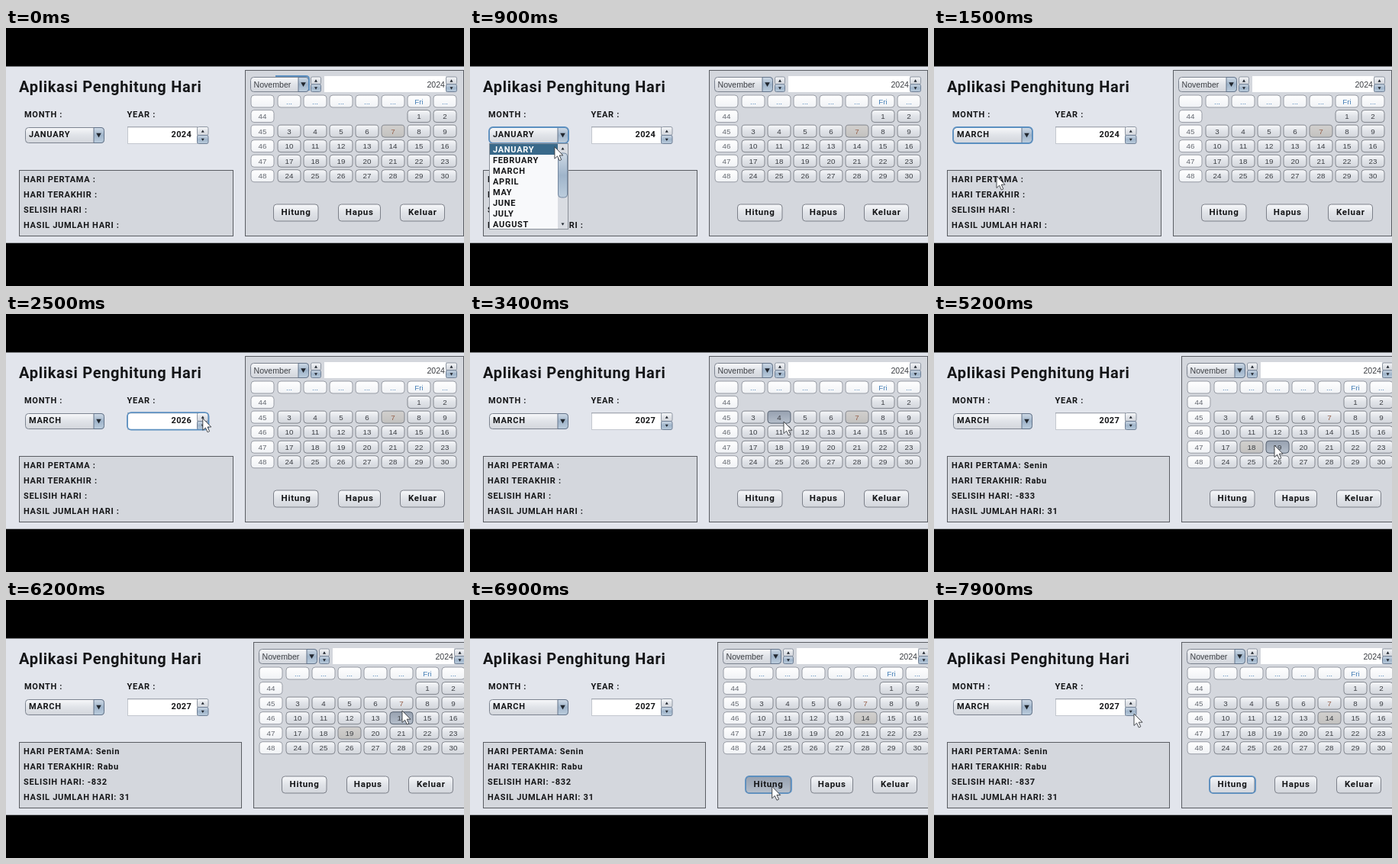
Write an HTML page that moves like this. It is 600x338 px and loops after 8 s.

```html
<!DOCTYPE html>
<html lang="id">
<head>
<meta charset="utf-8">
<title>Aplikasi Penghitung Hari</title>
<style>
  html, body { margin: 0; width: 100%; height: 100%; overflow: hidden; background: #000; }
  svg { display: block; width: 600px; height: 338px; }
  .din { font: 600 11px Roboto, sans-serif; letter-spacing: .7px; fill: #141517; white-space: pre; }
  .title { font-size: 20px; letter-spacing: .7px; }
  .num { letter-spacing: .4px; }
  .btn { font-size: 11.5px; letter-spacing: .75px; }
  .cal { font: 9.8px "Liberation Sans", Arial, sans-serif; fill: #3c3f44; }
  .big { font-size: 10.6px; }
  .mid { text-anchor: middle; }
  .end { text-anchor: end; }
</style>
</head>
<body>
<svg id="stage" viewBox="0 0 600 338">
  <defs>
    <linearGradient id="face" x2="0" y2="1">
      <stop stop-color="#f7f8fa"/><stop offset=".5" stop-color="#e0e3e8"/><stop offset="1" stop-color="#d3d6dc"/>
    </linearGradient>
    <linearGradient id="pale" x2="0" y2="1">
      <stop stop-color="#fff"/><stop offset="1" stop-color="#f0f2f5"/>
    </linearGradient>
    <linearGradient id="picked" x2="0" y2="1">
      <stop stop-color="#d2d0ce"/><stop offset="1" stop-color="#c2c1bf"/>
    </linearGradient>
    <linearGradient id="down" x2="0" y2="1">
      <stop stop-color="#98a2b1"/><stop offset=".5" stop-color="#a5afbd"/><stop offset="1" stop-color="#b6bfcb"/>
    </linearGradient>
    <linearGradient id="blue" x2="0" y2="1">
      <stop stop-color="#cfdae6"/><stop offset=".5" stop-color="#9fb4ca"/><stop offset="1" stop-color="#bccddd"/>
    </linearGradient>
  </defs>
</svg>
<script>
const NS = 'http://www.w3.org/2000/svg', LOOP = 8000, STEP = 100, SHIFT = 11;
const stage = document.getElementById('stage');

function add(parent, tag, attrs = {}, text) {
  const el = document.createElementNS(NS, tag);
  for (const k in attrs) el.setAttribute(k, attrs[k]);
  if (text !== undefined) el.textContent = text;
  parent.appendChild(el);
  return el;
}
const box = (p, x, y, width, height, fill, stroke = 'none', rx = 0) =>
  add(p, 'rect', { x, y, width, height, fill, stroke, rx });
const label = (p, x, y, text, cls) => add(p, 'text', { x, y, class: cls }, text);
const show = (el, on) => el.setAttribute('visibility', on ? 'visible' : 'hidden');

function ring(p, x, y, w, h) {
  const el = box(p, x, y, w, h, 'none', '#5b8fc0', 5);
  el.setAttribute('stroke-width', 1.8);
  return el;
}
function arrow(p, x, y, s, dir) {
  add(p, 'path', { d: `M${x - s} ${y - s * dir * .8}h${2 * s}l${-s} ${s * dir * 1.7}z`, fill: '#20262e' });
}
function combo(p, x, y, w, h) {
  box(p, x + .5, y + .5, w - 1, h - 1, 'url(#face)', '#7d8490', 4);
  add(p, 'path', {
    d: `M${x + w - 14} ${y + .5}h10q3.5 0 3.5 4v${h - 9}q0 4 -3.5 4h-10z`,
    fill: 'url(#blue)', stroke: '#64748a'
  });
  arrow(p, x + w - 7.5, y + h / 2, 3.3, 1);
}
function spinner(p, x, y, w, h) {
  const half = h / 2;
  box(p, x + .5, y + .5, w - 1, half - .5, 'url(#face)', '#8f97a3', 2);
  box(p, x + .5, y + half, w - 1, half - .5, 'url(#blue)', '#6f7f95', 2);
  arrow(p, x + w / 2, y + half / 2 + .5, 2, -1);
  arrow(p, x + w / 2, y + half * 1.5, 2, 1);
}
function field(p, x, y, w, h) {
  box(p, x + .5, y + .5, w - 1, h - 1, '#fff', '#c3c7ce');
  box(p, x, y, w, 1.3, '#a4a9b2');
}

box(stage, 0, 0, 600, 338, '#000');
const win = add(stage, 'g');
box(win, 0, 50.4, 600, 231.3, '#e2e5ec');

// Inputs on the left
label(win, 17, 84, 'Aplikasi Penghitung Hari', 'din title');
label(win, 24, 117, 'MONTH :', 'din');
label(win, 158.5, 117, 'YEAR :', 'din');
combo(win, 25, 130, 104, 21);
const monthText = label(win, 30, 143, '', 'din');
const monthRing = ring(win, 25, 130, 104, 21);
field(win, 159, 129, 92, 23);
spinner(win, 250, 129, 15.5, 23);
const yearText = label(win, 243.3, 143, '', 'din num end');
const yearRing = ring(win, 159, 129.2, 106.5, 22.5);

// Result panel
const panel = box(win, 17.5, 186.5, 280, 86, '#d4d7dd', '#5a5d63');
const heads = ['HARI PERTAMA', 'HARI TERAKHIR', 'SELISIH HARI', 'HASIL JUMLAH HARI'];
const lines = heads.map((_, i) => label(win, 23, 202 + 20.1 * i, '', 'din'));

// Calendar panel
const cal = add(win, 'g');
box(cal, 313.5, 55.5, 286, 217, '#d4d7dd', '#5a5d63');
combo(cal, 320, 64, 77, 20);
label(cal, 324.5, 78, 'November', 'cal big');
const calRing = add(cal, 'path', {
  d: 'M353 63H393q4 0 4 4V82', fill: 'none', stroke: '#5b8fc0', 'stroke-width': 1.8
});
spinner(cal, 399, 63.5, 14, 20.5);
box(cal, 417, 63, 159, 21, '#fff');
label(cal, 575, 78, '2024', 'cal big end');
spinner(cal, 576, 63.5, 15, 20.5);

const colX = c => 371 + 34 * c, rowY = r => 96 + 19.55 * r;
function cell(x, y, text, pale) {
  const face = box(cal, x - 15, y - 8, 30, 16, pale ? 'url(#pale)' : 'url(#face)', pale ? '#999da6' : '#82868e', 4);
  const txt = label(cal, x, y + 3.6, text, 'cal mid');
  return { face, txt };
}
for (let r = 0; r < 6; r++) {
  const week = cell(336, rowY(r), r ? 43 + r : '', true);
  week.txt.style.fill = '#666a72';
}
for (let c = 0; c < 7; c++) {
  const head = cell(colX(c), rowY(0), c === 5 ? 'Fri' : '...', true);
  head.txt.style.fill = '#4a82b8';
}
const days = {};
for (let d = 1; d <= 30; d++) {
  const n = d + 4;
  days[d] = cell(colX(n % 7), rowY(1 + Math.floor(n / 7)), d);
}
days[7].txt.style.fill = '#96604a';

const buttons = [['Hitung', 350, 59.5], ['Hapus', 435, 56], ['Keluar', 516, 59]].map(([name, x, w]) => {
  const face = box(cal, x + .5, 231, w - 1, 22, 'url(#face)', '#7c8089', 4);
  label(cal, x + w / 2 + .3, 245, name, 'din btn mid');
  return face;
});
const calcRing = ring(cal, 350, 231, 60, 22.2);

// Month list
const names = ['JANUARY', 'FEBRUARY', 'MARCH', 'APRIL', 'MAY', 'JUNE', 'JULY', 'AUGUST'];
const popup = add(win, 'g');
box(popup, 25.5, 151.5, 103, 112, '#f8f9fb', '#8a9099');
const rows = names.map((name, i) => {
  const bar = box(popup, 26, 152 + 14 * i, 89, 14, '#39698a');
  return { bar, txt: label(popup, 30, 163 + 14 * i, name, 'din') };
});
box(popup, 115, 152, 13, 111, '#d9dce2');
box(popup, 115.5, 164, 12, 58, 'url(#blue)', '#7488a0', 4);
arrow(popup, 121.5, 158, 2, -1);
arrow(popup, 121.5, 257, 2, 1);

const cursor = add(stage, 'path', {
  d: 'M0 0V15.5L3.6 12.2L6.3 18L8.8 16.8L6.2 11.2H11Z',
  fill: '#fff', stroke: '#33363b', 'stroke-width': .9, 'stroke-linejoin': 'round'
});

// Pointer stops: time, x, y
const stops = [
  [100, 150, 190], [400, 122, 142], [700, 121, 143], [1300, 82, 192], [1500, 82, 194],
  [2000, 257, 136], [2700, 258, 137], [3300, 410, 140], [3400, 411, 141],
  [3700, 405, 174], [3900, 405, 174], [4300, 382, 246], [4500, 383, 249], [4700, 384, 248],
  [5100, 446, 171], [5300, 446, 173], [5600, 394, 244], [5800, 393, 245],
  [6200, 519, 145], [6400, 518, 149], [6800, 396, 244], [7100, 395, 245],
  [7500, 261, 147], [7700, 261, 147], [7900, 262, 149]
];
function pointer(t) {
  let i = 0;
  while (i < stops.length - 2 && t > stops[i + 1][0]) i++;
  const [t0, x0, y0] = stops[i], [t1, x1, y1] = stops[i + 1];
  const u = Math.min(1, Math.max(0, (t - t0) / (t1 - t0))), e = u * u * (3 - 2 * u);
  return [x0 + (x1 - x0) * e, y0 + (y1 - y0) * e];
}

// Latest value whose start time has passed
const at = (t, list) => list.reduce((v, [start, next]) => t >= start ? next : v, null);

function draw(t) {
  const [x, y] = pointer(t);
  const open = t >= 500 && t < 1400;
  const focus = at(t, [[0, 'cal'], [100, ''], [500, 'month'], [2100, 'year'], [3400, 'day'], [4400, 'calc'],
    [5200, 'day'], [5700, 'calc'], [6200, 'day'], [6900, 'calc']]);
  const chosen = at(t, [[0, 7], [3500, 4], [3900, 18], [5300, 19], [6300, 14]]);
  const held = at(t, [[0, 0], [3400, 4], [3500, 0], [3700, 18], [3900, 0], [5200, 19], [5300, 0], [6200, 14], [6300, 0]]);
  const pressed = at(t, [[0, 0], [4400, 1], [4600, 0], [5700, 1], [5800, 0], [6900, 1], [7000, 0]]);
  const diff = at(t, [[4600, -833], [5800, -832], [7000, -837]]);
  const done = diff !== null;

  monthText.textContent = t < 1400 ? 'JANUARY' : 'MARCH';
  yearText.textContent = at(t, [[0, 2024], [2100, 2025], [2300, 2026], [2600, 2027]]);
  show(monthRing, focus === 'month');
  show(yearRing, focus === 'year');
  show(calRing, focus === 'cal');
  show(calcRing, focus === 'calc');

  const values = ['Senin', 'Rabu', diff, 31];
  lines.forEach((el, i) => el.textContent = heads[i] + (done ? ': ' + values[i] : ' :'));
  panel.setAttribute('width', 280 + (done ? SHIFT : 0));
  cal.setAttribute('transform', `translate(${done ? SHIFT : 0} 0)`);

  for (const d in days) {
    const look = +d === held ? 'down' : +d === chosen ? 'picked' : 'face';
    days[d].face.setAttribute('fill', `url(#${look})`);
    days[d].face.setAttribute('stroke', look === 'down' ? '#566170' : '#82868e');
  }
  buttons[0].setAttribute('fill', pressed ? 'url(#down)' : 'url(#face)');

  popup.style.display = open ? '' : 'none';
  const hot = Math.min(2, Math.max(0, Math.floor((y - 152) / 14)));
  rows.forEach(({ bar, txt }, i) => {
    bar.style.display = i === hot ? '' : 'none';
    txt.style.fill = i === hot ? '#fff' : '#141517';
  });

  show(cursor, t >= 100);
  cursor.setAttribute('transform', `translate(${x.toFixed(1)} ${y.toFixed(1)})`);
}

const begin = performance.now();
function tick() {
  const t = (performance.now() - begin) % LOOP;
  draw(Math.floor(t / STEP) * STEP);
  requestAnimationFrame(tick);
}
draw(0);
requestAnimationFrame(tick);
</script>
</body>
</html>
```
